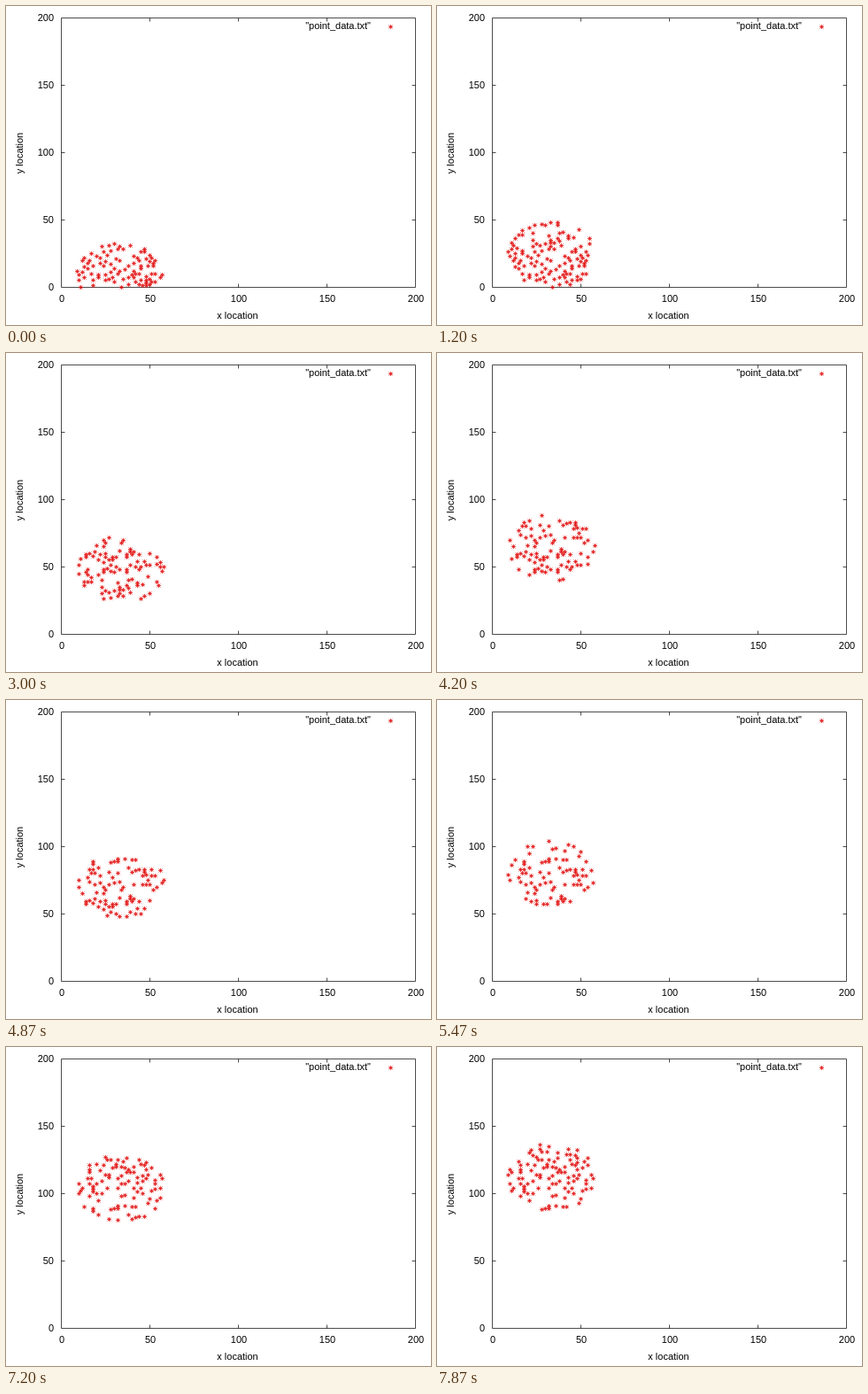
Animation, 480 px wide and 360 px high, one loop 8 s. Source, as an HTML page with a canvas:

```html
<!DOCTYPE html>
<html lang="en">
<head>
<meta charset="utf-8">
<title>Point plot</title>
<style>
  html, body { margin: 0; width: 100%; height: 100%; overflow: hidden; background: #fff; }
  canvas, svg { position: absolute; left: 0; top: 0; display: block; }
  text { font: 11px "Liberation Sans", Arial, sans-serif; fill: #000; }
</style>
</head>
<body>
<canvas id="plot" width="480" height="360"></canvas>
<svg id="labels" width="480" height="360"></svg>
<script>
const ctx = document.getElementById("plot").getContext("2d");
const labels = document.getElementById("labels");
const LOOP = 8000, STEP = 600;
const LEFT = 62.5, TOP = 13.5, W = 400, H = 304, MAX = 200;
const CENTER_X = 33.5, RADIUS = 25, RISE = 8;
const POINTS = 370, TALLEST = 137, GAP = 2;

const px = v => LEFT + v * W / MAX;
const py = v => TOP + H - v * H / MAX;

let seed = 20117;
function random() {
  seed = (seed * 1664525 + 1013904223) % 4294967296;
  return seed / 4294967296;
}

// Fixed field of whole-number points, slightly denser near the bottom
function makeField() {
  const field = [];
  for (let tries = 0; tries < 5000 && field.length < POINTS; tries++) {
    const x = 9 + Math.floor(random() * 50);
    const y = Math.round(TALLEST * Math.pow(random(), 1.12));
    if (field.every(p => Math.hypot(p.x - x, p.y - y) >= GAP)) field.push({ x, y });
  }
  return field;
}

function addText(text, x, y, anchor, turn = 0) {
  const el = document.createElementNS("http://www.w3.org/2000/svg", "text");
  el.setAttribute("transform", `translate(${x} ${y}) rotate(${turn})`);
  el.setAttribute("text-anchor", anchor);
  el.textContent = text;
  labels.append(el);
}

function addLabels() {
  for (let v = 0; v <= MAX; v += 50) {
    addText(v, px(v) + 0.5, 333.5, "middle");
    addText(v, 54, py(v) + 3, "end");
  }
  addText("x location", 261.5, 353, "middle");
  addText("y location", 19, 166, "middle", -90);
  addText('"point_data.txt"', 412, 26, "end");
}

function line(x, y, dx, dy) {
  ctx.moveTo(x, y);
  ctx.lineTo(x + dx, y + dy);
}

function drawAxes() {
  ctx.strokeStyle = "#000";
  ctx.lineWidth = 0.7;
  ctx.beginPath();
  ctx.rect(LEFT, TOP, W, H);
  for (let v = 50; v < MAX; v += 50) {
    line(px(v), TOP, 0, 4);
    line(px(v), TOP + H, 0, -4);
    line(LEFT, py(v), 4, 0);
    line(LEFT + W, py(v), -4, 0);
  }
  ctx.stroke();
}

function star(x, y) {
  line(x - 2.5, y, 5, 0);
  line(x, y - 2.5, 0, 5);
  line(x - 2, y - 2, 4, 4);
  line(x - 2, y + 2, 4, -4);
}

function drawPoints(centerY) {
  ctx.strokeStyle = "#e00000";
  ctx.lineWidth = 0.7;
  ctx.beginPath();
  star(434.5, 23.5);
  for (const { x, y } of field) {
    if (Math.hypot(x - CENTER_X, y - centerY) <= RADIUS) {
      star(px(x), Math.floor(py(y)) + 0.5);
    }
  }
  ctx.stroke();
}

// The round window climbs over the field in steps
function draw(time) {
  ctx.clearRect(0, 0, 480, 360);
  drawAxes();
  drawPoints(RISE * (1 + Math.floor(time / STEP)));
}

function tick() {
  draw(performance.now() % LOOP);
  requestAnimationFrame(tick);
}

const field = makeField();
addLabels();
tick();
</script>
</body>
</html>
```
